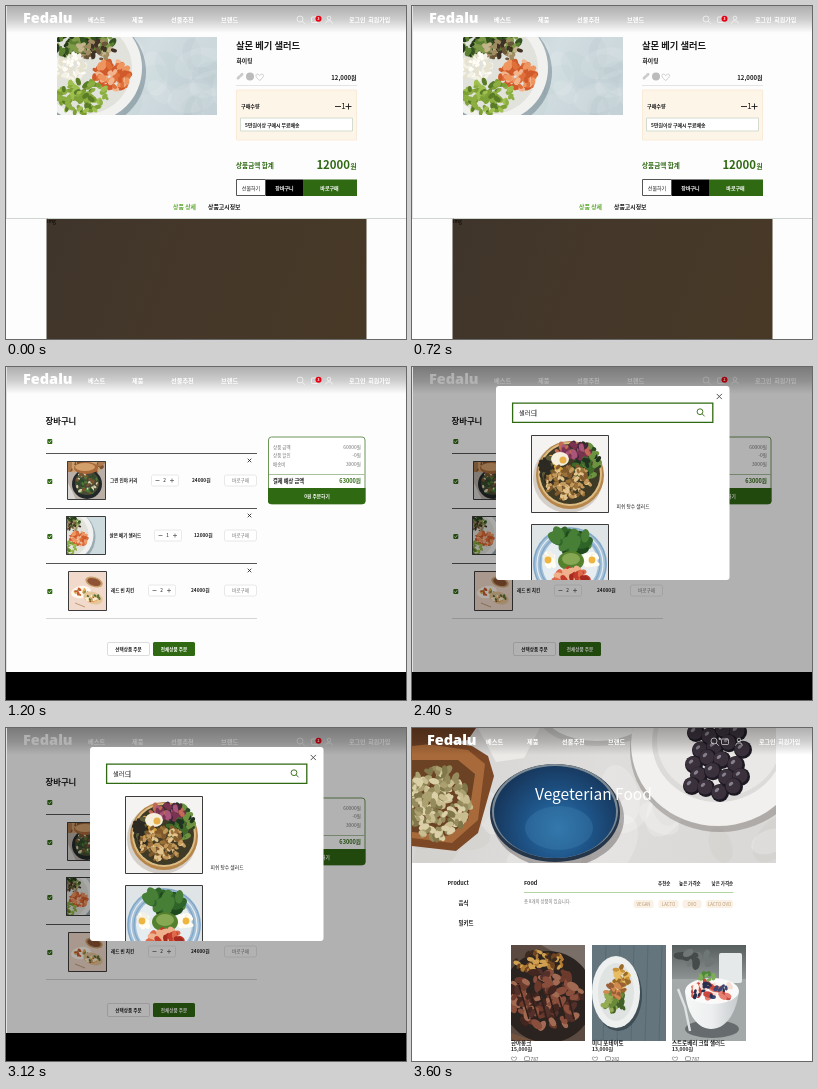
These frames come from a looping animation (400 by 333 pixels, 4800 ms). An HTML page with a canvas:

```html
<!DOCTYPE html>
<html lang="ko">
<head>
<meta charset="utf-8">
<style>
html, body { margin: 0; width: 100%; height: 100%; overflow: hidden; background: #fff; }
canvas { display: block; }
</style>
</head>
<body>
<canvas id="stage" width="400" height="333"></canvas>
<script>
const c = document.getElementById('stage').getContext('2d');
const FONT = '"Noto Sans CJK KR", "Noto Sans CJK JP", "Noto Sans", sans-serif';
const GREEN = '#2f6912', INK = '#1c1c1c', GREY = '#777';

// --- basic helpers ---
function text(s, x, y, size, color = INK, weight = 700, align = 'left', font = FONT) {
  c.font = `${weight} ${size}px ${font}`;
  c.textAlign = align;
  c.textBaseline = 'middle';
  c.fillStyle = color;
  c.fillText(s, x, y);
}
function rect(x, y, w, h, color) {
  c.fillStyle = color;
  c.fillRect(x, y, w, h);
}
function box(x, y, w, h, r, fill, stroke, lw = 1) {
  c.beginPath();
  c.roundRect(x, y, w, h, r);
  if (fill) { c.fillStyle = fill; c.fill(); }
  if (stroke) { c.strokeStyle = stroke; c.lineWidth = lw; c.stroke(); }
}
function oval(x, y, rx, ry, color, turn = 0) {
  c.beginPath();
  c.ellipse(x, y, rx, ry, turn, 0, 7);
  c.fillStyle = color;
  c.fill();
}
const disc = (x, y, r, color) => oval(x, y, r, r, color);
function line(color, lw, ...p) {
  c.beginPath();
  c.moveTo(p[0], p[1]);
  for (let i = 2; i < p.length; i += 2) c.lineTo(p[i], p[i + 1]);
  c.strokeStyle = color;
  c.lineWidth = lw;
  c.stroke();
}
function shape(color, ...p) {
  c.beginPath();
  for (let i = 0; i < p.length; i += 2) c.lineTo(p[i], p[i + 1]);
  c.fillStyle = color;
  c.fill();
}
function ring(x, y, r, color, lw = 1) {
  c.beginPath();
  c.arc(x, y, r, 0, 7);
  c.strokeStyle = color;
  c.lineWidth = lw;
  c.stroke();
}
function addStops(g, colors) {
  colors.forEach((k, i) => g.addColorStop(i / (colors.length - 1), k));
  return g;
}
const fade = (x0, y0, x1, y1, ...colors) => addStops(c.createLinearGradient(x0, y0, x1, y1), colors);
const glow = (x, y, r, ...colors) => addStops(c.createRadialGradient(x, y, 0, x, y, r), colors);
function random(seed) {
  return () => (seed = (seed * 16807) % 2147483647) / 2147483647;
}
// loose oval bits spread over an elliptical patch
function scatter(seed, n, x, y, rx, ry, size, colors) {
  const rnd = random(seed * 7919);
  for (let i = 0; i < n; i++) {
    const a = rnd() * 6.28, d = Math.sqrt(rnd()), s = size * (.7 + rnd() * .6);
    oval(x + Math.cos(a) * d * rx, y + Math.sin(a) * d * ry, s, s * .6,
      colors[Math.floor(rnd() * colors.length)], rnd() * 3);
  }
}
function photo(x, y, w, h, bg, paint, border) {
  c.save();
  c.beginPath();
  c.rect(x, y, w, h);
  c.clip();
  c.translate(x, y);
  rect(0, 0, w, h, bg);
  paint();
  c.restore();
  if (border) box(x + .5, y + .5, w - 1, h - 1, 0, null, '#3c3c3c');
}

// --- icons ---
function cross(x, y, r, color = INK, lw = 1) {
  line(color, lw, x - r, y - r, x + r, y + r);
  line(color, lw, x - r, y + r, x + r, y - r);
}
function lens(x, y, r, color, lw) {
  ring(x, y, r, color, lw);
  line(color, lw, x + r * .7, y + r * .7, x + r * 1.6, y + r * 1.6);
}
function heart(x, y, r, color) {
  c.beginPath();
  c.moveTo(x, y + r);
  c.bezierCurveTo(x - r * 2, y - r * .3, x - r * .8, y - r * 1.6, x, y - r * .4);
  c.bezierCurveTo(x + r * .8, y - r * 1.6, x + r * 2, y - r * .3, x, y + r);
  c.strokeStyle = color;
  c.lineWidth = .7;
  c.stroke();
}
function check(x, y) {
  box(x - 2.5, y - 2.5, 5, 5, 1, GREEN);
  line('#fff', .8, x - 1.4, y, x - .4, y + 1.2, x + 1.5, y - 1.3);
}

// --- food pictures ---
function salmonPlate(x, y, r) {
  c.save();
  c.translate(x, y);
  c.scale(r / 55, r / 55);
  disc(3, 4, 55, 'rgba(80,100,112,.4)');
  disc(0, 0, 54, '#f1f2f0');
  disc(-2, 0, 46, '#e2e2dc');
  scatter(4, 110, -10, -26, 36, 14, 4, ['#33521f', '#5b7f30', '#24391a', '#7f9a48']);
  scatter(5, 50, 8, -18, 18, 10, 3, ['#6a5638', '#a08c62', '#3e3226', '#c4b48c']);
  scatter(3, 70, -18, -1, 17, 13, 3, ['#f4f1e6', '#e6e2d0', '#fffdf5']);
  scatter(6, 80, 25, 7, 19, 14, 4, ['#e0703a', '#ee9560', '#d05a2b', '#f2b48c']);
  scatter(7, 95, -6, 29, 27, 17, 3.4, ['#7da035', '#9fc04f', '#5a7c26', '#8cae42']);
  c.restore();
}
function curryBowl() {
  scatter(8, 30, 20, 5, 24, 6, 5, ['#ad7a4d', '#cba06f', '#80502e']);
  disc(20, 23, 15, '#22282a');
  disc(20, 22, 12, '#484a35');
  scatter(9, 50, 20, 22, 11, 10, 2, ['#d8cfae', '#4f7a35', '#7a5330', '#2c4a2a']);
  oval(19, 7, 12, 6, '#a9683a');
  oval(18, 6, 10, 4, '#d3a06c');
  shape('#d9d7d3', 0, 20, 5, 30, 9, 39, 0, 39);
}
function lunchBoxes() {
  oval(26, 11, 9, 5, '#caa06e', .3);
  oval(26, 11, 7, 3.6, '#8d5334', .3);
  oval(13, 21, 10, 6, '#fff8ef', -.2);
  scatter(10, 24, 13, 21, 7, 3.5, 1.6, ['#c9582f', '#7d9440', '#e6b057']);
  oval(25, 27, 10, 6, '#e6c69b', .3);
  scatter(11, 26, 25, 27, 7, 3.5, 1.6, ['#a04a2a', '#e1a04e', '#fff0d0', '#5d7136']);
  line('#b58b63', .8, 7, 32, 17, 36);
}
function grainBowl() {
  disc(37, 43, 35, 'rgba(120,100,80,.25)');
  disc(39, 40, 34, '#b5854a');
  disc(39, 39, 32, '#dcbd85');
  disc(39, 39, 30, '#3f3a26');
  scatter(13, 60, 56, 26, 12, 16, 4, ['#3f6a2a', '#2a4a22', '#6d9340', '#1f3320']);
  scatter(14, 40, 20, 34, 10, 13, 4, ['#2c2a22', '#5c5a38', '#d9a43e']);
  scatter(12, 45, 42, 15, 17, 7, 3.6, ['#7a3350', '#a9567a', '#47263a', '#c26a54']);
  oval(29, 24, 9, 7, '#f5efdc');
  disc(32, 25, 3.5, '#e8b04a');
  scatter(15, 150, 37, 47, 22, 17, 2.6, ['#c39a5c', '#9a7138', '#e2c48c', '#80592c']);
}
function eggPlate() {
  disc(39, 40, 37, '#a5c0d6');
  for (let r = 36; r > 27; r -= 3) ring(39, 40, r, r % 2 ? '#e4eef4' : '#7fa6c8', 1.2);
  disc(39, 40, 28, '#e6edf0');
  scatter(16, 34, 39, 17, 18, 11, 7, ['#2f6429', '#487f36', '#1f4a1c']);
  for (const x of [17, 61]) {
    scatter(x, 14, x, 36, 7, 6, 4, ['#fffdf4', '#f4f0e4']);
    disc(x, 36, 3.4, '#eeb540');
  }
  oval(40, 37, 13, 10, '#55812f');
  oval(40, 35, 9, 6, '#86a852');
  scatter(17, 30, 40, 53, 19, 8, 5, ['#c23a2a', '#de6a4c', '#a52a20', '#efb08c']);
}
function steak() {
  shape('#7a6f68', 30, 0, 74, 0, 74, 28, 52, 12);
  oval(37, 52, 46, 46, '#2b2320');
  scatter(18, 60, 30, 17, 26, 10, 3, ['#b07a35', '#d0a050', '#6e4520', '#3d2a1e']);
  scatter(19, 120, 36, 54, 36, 30, 5, ['#6b3a2c', '#8a4f3c', '#432620', '#a26a52', '#54302a']);
  for (let i = 0; i < 6; i++) line('#321f19', 1.6, 8 + i * 10, 40 + i * 3, 18 + i * 9, 74);
  shape('#74543f', 0, 88, 24, 96, 0, 96);
}
function potatoPlate() {
  for (let i = 1; i < 6; i++) line('#55666f', .8, i * 14, 0, i * 14 - 3, 96);
  oval(26, 50, 24, 36, '#3f4d55');
  oval(24, 47, 24, 36, '#eef0ef');
  oval(24, 47, 18, 29, '#dfe3e2');
  scatter(20, 45, 29, 34, 8, 12, 3.4, ['#c99138', '#e8bd62', '#9a6a2a']);
  scatter(21, 45, 23, 57, 11, 12, 3.4, ['#6a8a3a', '#93ab52', '#41602a']);
  scatter(22, 20, 24, 46, 10, 7, 3.4, ['#9b5f38', '#cf8a50']);
}
function berryBowl() {
  rect(0, 0, 74, 34, fade(0, 0, 0, 34, '#575e5e', '#8d9392'));
  scatter(31, 12, 22, 14, 18, 8, 5, ['#454b4a', '#6f7776']);
  box(47, 8, 23, 30, 2, '#e6e9ea');
  oval(40, 84, 27, 9, '#666b6d');
  line('#dfe2e3', 2.4, 6, 44, 13, 62, 18, 86);
  c.beginPath();
  c.moveTo(13, 46);
  c.bezierCurveTo(15, 70, 26, 84, 39, 84);
  c.bezierCurveTo(53, 84, 64, 70, 67, 46);
  c.fillStyle = fade(13, 0, 67, 0, '#f7f8f8', '#eceeef', '#c6cacc');
  c.fill();
  oval(40, 46, 27, 13, '#fafafa');
  scatter(23, 40, 40, 45, 21, 9, 4, ['#c9473f', '#e58072', '#fff5ef', '#f7ded4']);
  scatter(24, 16, 38, 46, 20, 8, 2.6, ['#28304f', '#3d4670']);
  scatter(25, 10, 34, 32, 8, 4, 3, ['#4f8a3a', '#7fae58']);
}
function grape(x, y) {
  disc(x, y, 9, '#1d1923');
  disc(x - 1, y - 1, 7.5, '#3a313c');
  oval(x - 3, y - 3, 2.6, 1.6, '#85808c', -.7);
}
function hero() {
  scatter(26, 30, 182, 100, 190, 40, 26, ['rgba(255,255,255,.2)', 'rgba(150,148,146,.08)']);
  oval(185, -12, 58, 30, '#c9c8c6');
  oval(185, -14, 52, 27, '#f0f0ee');
  shape('#eceae7', 66, 0, 128, 0, 112, 30, 84, 34);
  // wooden bowl with seeds
  shape('#7d4826', 0, 8, 60, 18, 76, 28, 82, 48, 66, 105, 44, 123, 0, 118);
  shape('#a86a3a', 0, 14, 56, 22, 73, 36, 66, 92, 40, 115, 0, 110);
  shape('#6b4224', 0, 32, 46, 32, 63, 46, 56, 92, 36, 108, 0, 104);
  scatter(27, 210, 25, 75, 32, 35, 4.4, ['#aaa070', '#c9bd90', '#80774a', '#dacfa6', '#968b5c']);
  shape('#6e4024', 0, 0, 64, 0, 56, 12, 0, 18);
  // blue bowl
  oval(146, 90, 66, 50, 'rgba(70,65,65,.4)');
  oval(143, 85, 65, 49, '#26364a');
  oval(143, 83, 63, 47, '#7c8a94');
  oval(143, 84, 61, 46, glow(146, 100, 66, '#2d74a8', '#1e5488', '#17375c'));
  oval(147, 100, 34, 22, 'rgba(65,130,178,.35)');
  // plate with grapes
  oval(308, 22, 90, 82, 'rgba(90,85,82,.35)');
  oval(306, 16, 87, 82, '#f1f0ee');
  oval(306, 14, 66, 60, '#dddbd9');
  oval(307, 13, 62, 56, '#eae8e6');
  line('#7d7c4c', 2, 300, 46, 306, 20, 318, 0);
  for (let row = 0; row < 5; row++)
    for (let i = 0; i < 4; i++) grape(284 + i * 14 + (row % 2) * 6 - row, 5 + row * 14 + Math.sin(i * 2 + row) * 4);
}

// --- page parts ---
function header(x, nav, login, count) {
  rect(0, 0, 400, 27, fade(0, 0, 0, 27, 'rgba(0,0,0,.31)', 'rgba(0,0,0,.19)', 'rgba(0,0,0,0)'));
  text('Fedalu', x, 13.5, 14.5, '#fff', 800, 'left', '"Open Sans", sans-serif');
  ['베스트', '제품', '선물추천', '브랜드'].forEach((s, i) => text(s, nav[i], 14, 6.2, '#fff'));
  const k = login - 343, pale = 'rgba(255,255,255,.75)';
  lens(294 + k * 2, 13, 3, pale, .8);
  box(305.5 + k, 11, 7, 5.5, 1, null, pale, .8);
  ring(323 + k, 12, 1.8, pale, .8);
  line(pale, .8, 319.5 + k, 17.5, 321 + k, 15, 325 + k, 15, 326.5 + k, 17.5);
  if (count) {
    disc(312.5, 12.8, 3, '#e60012');
    text(count, 312.5, 12.8, 4, '#fff', 700, 'center');
  }
  text('로그인  회원가입', login, 14, 6, '#fff');
}
const NAV = [82, 126, 165, 215];

function product() {
  rect(0, 0, 400, 333, '#fdfdfd');
  header(17, NAV, 343, '3');
  photo(51, 31, 160, 78, fade(0, 0, 160, 78, '#b9c8ce', '#d3dee2', '#bfcdd3'), () => {
    scatter(30, 22, 110, 40, 60, 45, 20, ['rgba(255,255,255,.1)', 'rgba(140,162,172,.07)']);
    salmonPlate(31, 31, 55);
  });
  text('살몬 베기 샐러드', 230, 39.5, 9.3);
  text('화이팅', 230.5, 54.7, 5.8);
  oval(232.7, 71.5, 2.5, 1.5, '#ccc', -.8);
  oval(235.4, 69, 2.5, 1.5, '#ccc', -.8);
  disc(244, 70.5, 4, '#bbb');
  heart(253.7, 71, 3.4, '#bbb');
  text('12,000원', 350.5, 72, 6, INK, 700, 'right');
  rect(230, 79, 121, 1, '#e4e4e4');
  box(230.5, 84, 120, 50, 0, '#fef5e9', '#faebd8');
  text('구매수량', 235, 100.5, 5.1);
  line(INK, .9, 329, 100.5, 335, 100.5);
  text('1', 337.4, 100.3, 8, INK, 500, 'center');
  line(INK, .9, 339.5, 100.5, 345.5, 100.5);
  line(INK, .9, 342.5, 97.5, 342.5, 103.5);
  box(234.5, 112, 112, 13, 0, '#fff', '#d3dccf');
  text('5만원이상 구매시 무료배송', 239, 118.8, 4.9);
  text('상품금액 합계', 230, 159.5, 6.6, GREEN);
  text('12000', 344, 159, 11.4, GREEN, 700, 'right');
  text('원', 350.5, 160.5, 6.6, GREEN, 700, 'right');
  box(230.5, 173.5, 29, 16, 0, '#fff', '#555');
  rect(260, 173.5, 37, 16.5, '#000');
  rect(297, 173.5, 54, 16.5, GREEN);
  text('선물하기', 245, 181.8, 5, INK, 500, 'center');
  text('장바구니', 278.5, 181.8, 5, '#fff', 700, 'center');
  text('바로구매', 323.5, 181.8, 5, '#fff', 700, 'center');
  text('상품 상세', 167, 200.5, 5.9, '#5fa832');
  text('상품고시정보', 202, 200.5, 5.9);
  rect(0, 212, 400, 1, '#cfd6cf');
  rect(0, 0, 1, 212, '#e2e2e2');
  rect(40.5, 213, 320, 120, fade(41, 213, 361, 333, '#40352b', '#45382a', '#483926'));
  text('img', 41, 215.5, 5, '#000', 500);
}

function cartRow(y, name, x, qx, count, price, px) {
  check(43.8, y + 1);
  cross(243.5, y - 20, 1.8, INK, .8);
  text(name, x, y, 4.6);
  box(qx + .5, y - 5.5, 27, 11, 1.5, '#fff', '#e3e3e3', .8);
  line('#555', .7, qx + 4.5, y, qx + 8.5, y);
  text(count, qx + 13.7, y, 4.8, INK, 500, 'center');
  line('#555', .7, qx + 19, y, qx + 23, y);
  line('#555', .7, qx + 21, y - 2, qx + 21, y + 2);
  text(price, px, y, 4.8);
  box(218.5, y - 5.5, 32, 11, 2, '#fff', '#e3e3e3', .8);
  text('바로구매', 234.5, y, 4.6, GREY, 400, 'center');
}
function cart(count = '3') {
  rect(0, 0, 400, 305, '#fdfdfd');
  header(17, NAV, 343, count);
  rect(0, 0, 1, 305, '#e2e2e2');
  text('장바구니', 39.5, 54, 8.4);
  check(43.8, 74.5);
  for (const y of [86, 141, 196]) rect(40, y, 211, 1, '#555');
  rect(40, 251, 211, 1, '#d5d5d5');
  cartRow(113.5, '그린 인야 커리', 104, 145, '2', '24000원', 186);
  cartRow(168.5, '살몬 베기 샐러드', 103.5, 148, '1', '12000원', 188);
  cartRow(223.5, '레드 빈 치킨', 105, 142, '2', '24000원', 185);
  photo(61, 94, 39, 39, '#b9afa7', curryBowl, true);
  photo(60, 149, 40, 39, '#cddade', () => salmonPlate(1, 19, 27), true);
  photo(62, 204, 39, 40, '#f1dacb', lunchBoxes, true);

  box(262.5, 70, 96.5, 67, 3, '#fff', '#6d9659');
  const rows = [['상품 금액', '60000원'], ['상품 할인', '-0원'], ['배송비', '3000원']];
  rows.forEach(([a, b], i) => {
    text(a, 267, 80 + i * 8.5, 4.5, GREY, 400);
    text(b, 355, 80 + i * 8.5, 4.8, GREY, 500, 'right');
  });
  rect(263, 107, 96, 1, '#a9c09d');
  text('결제 예상 금액', 267, 114, 5.2);
  text('63000원', 355, 114, 5.6, GREEN, 700, 'right');
  box(262, 121, 97.5, 16, [0, 0, 3, 3], GREEN);
  text('0원 주문하기', 311, 128.8, 4.7, '#fff', 700, 'center');
  box(101.5, 275.5, 42, 13, 1.5, '#fff', '#ddd');
  text('선택상품 주문', 122.5, 282, 4.6, INK, 700, 'center');
  box(147, 275, 42, 14, 1.5, GREEN);
  text('전체상품 주문', 168, 282, 4.6, '#fff', 700, 'center');
  rect(0, 305, 400, 28, '#000');
}

function search() {
  cart('2');
  rect(1, 0, 399, 305, 'rgba(0,0,0,.3)');
  box(84, 19, 233.5, 194, 3, '#fff');
  cross(307.3, 29.5, 2.6, '#444', .9);
  box(100.6, 36.2, 200.2, 19.2, 0, '#fff', GREEN, 1.3);
  text('샐러드', 107, 45.7, 6.2, INK, 500);
  rect(123.5, 42.5, .8, 7, INK);
  lens(288, 44.7, 2.9, GREEN, .9);
  photo(119, 68, 78, 78, '#f4f3f1', grainBowl, true);
  text('피쉬 탕수 샐러드', 204.5, 139, 4.8, INK, 500);
  c.save();
  c.beginPath();
  c.rect(84, 19, 234, 194);
  c.clip();
  photo(119, 157, 78, 78, '#dfe4e7', eggPlate, true);
  c.restore();
}

function item(x, bg, paint, name, price, likes) {
  photo(x, 217, 74, 96, bg, paint);
  text(name, x, 315, 5.5);
  text(price, x, 321.3, 5);
  heart(x + 3, 331, 2.4, '#777');
  box(x + 13.5, 328.7, 5, 4, 1, null, '#777', .7);
  text(likes, x + 19.5, 331, 4.8, '#555', 400);
}
function list() {
  rect(0, 0, 400, 333, '#fff');
  photo(0, 0, 364, 135, fade(0, 0, 364, 135, '#d6d4d2', '#dfdddb', '#dad8d6'), hero);
  header(15, [74, 115, 150, 196], 347, '');
  text('Vegeterian Food', 123, 66, 15.5, '#fff', 400);
  text('Product', 35.5, 155, 5.4);
  text('음식', 46.5, 175, 5.5);
  text('밀키트', 46.5, 195, 5.5);
  text('Food', 112, 155, 5.4);
  text('추천순', 246, 155, 4.5);
  text('높은 가격순', 267, 155, 4.5);
  text('낮은 가격순', 299.5, 155, 4.5);
  rect(112, 164, 209.5, 1, '#b4d5a2');
  text('총 8개의 상품이 있습니다.', 112, 173.8, 4.4, GREY, 400);
  const tags = [['VEGAN', 221.5, 20], ['LACTO', 246.5, 20], ['OVO', 270.5, 19], ['LACTO OVO', 294, 27]];
  for (const [s, x, w] of tags) {
    box(x, 172, w, 8, 2.5, '#faf0e3');
    text(s, x + w / 2, 176, 4.4, '#b99b78', 400, 'center');
  }
  item(99, '#5a4a41', steak, '한아롱크', '15,000원', '787');
  item(180, '#64757e', potatoPlate, '미디 포테이토', '13,000원', '282');
  item(260, '#a3a8a8', berryBowl, '스트로베리 크림 샐러드', '13,000원', '787');
}

// --- playback ---
const SCENES = [product, cart, search, list], HOLD = 1200;
let shown = -1;
function tick() {
  const i = Math.floor(performance.now() / HOLD) % SCENES.length;
  if (i !== shown) {
    shown = i;
    SCENES[i]();
  }
  requestAnimationFrame(tick);
}
tick();
</script>
</body>
</html>
```
